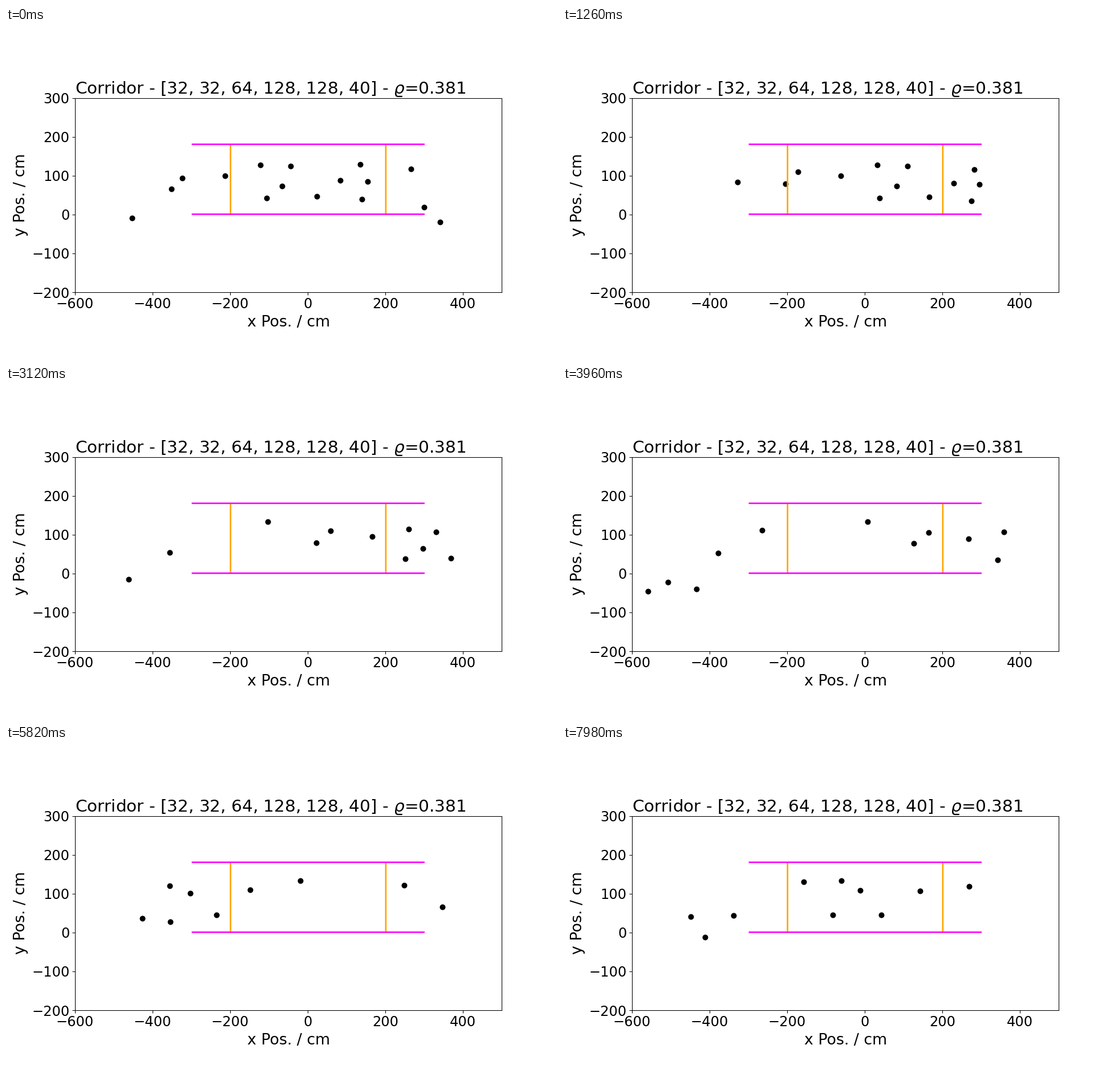
Animation, 966 px wide and 580 px high, one loop 8000 ms. Source, as a matplotlib script:

```python
import math

import matplotlib.pyplot as plt
import numpy as np
from matplotlib.animation import FuncAnimation
from matplotlib.transforms import ScaledTranslation

DPI, WIDTH, HEIGHT = 96, 966, 580
STEP = 0.06              # seconds between position updates
STEPS = 134
TICK_MS, FRAMES = 20, 400
START_Y, LEAVE_X = -45, 375
BEND_X = -418            # usual place where walkers turn into the corridor

# Already inside: x and lane, in cm
INSIDE = [(-351, 79), (-323, 110), (-213, 100), (-122, 128), (-106, 42),
          (-66, 74), (-44, 125), (23, 47), (84, 88), (135, 132), (139, 40),
          (154, 88), (266, 131), (300, 22), (341, -22)]

# Still approaching: entry time, entry x, lane, bend
APPROACHING = [(0, -453, 134, -378), (1.86, -492, 134, -368),
               (2.88, -489, 110, -400), (3.54, -485, 46, -380),
               (3.66, -543, 108, -432), (3.96, -558, 45, -380),
               (4.32, -523, 134, -488), (4.8, -545, 132, -418),
               (6.72, -470, 46, -410), (7.26, -527, 110, -458),
               (7.44, -481, 110, -355)]


def exit_ramp(x):
    return min(max((x - 100) / 250, 0), 1)


def height(x, lane, bend):
    """Sweep from the starting height into the lane, then sag at the exit."""
    width = max(0.4 * lane, 15)
    left = 1 / (1 + math.exp((x - bend) / width))
    return lane * (1 - 0.16 * exit_ramp(x)) - (lane - START_Y) * left


def walk(start, x, lane, bend=BEND_X):
    """Position at every step; upper lanes and later walkers are faster."""
    track = np.full((STEPS, 2), np.nan)
    for i in range(round(start / STEP), STEPS):
        if x > LEAVE_X:
            break
        y = height(x, lane, bend)
        track[i] = x, y
        speed = 117 + 0.1 * (lane - 84) + 2.2 * i * STEP
        speed *= 1 - 0.12 * exit_ramp(x)
        slope = height(x + 1, lane, bend) - y
        x += speed * STEP / math.hypot(1, slope)
    return track


tracks = np.array([walk(0, *spot) for spot in INSIDE]
                  + [walk(*entry) for entry in APPROACHING])

plt.rcParams["font.family"] = "DejaVu Sans"
fig, ax = plt.subplots(figsize=(WIDTH / DPI, HEIGHT / DPI), dpi=DPI)
ax.set_aspect("equal")
ax.set(xlim=(-600, 500), ylim=(-200, 300),
       xticks=range(-600, 401, 200), yticks=range(-200, 301, 100))
ax.tick_params(labelsize=18.1)
ax.set_xlabel("x Pos. / cm", fontsize=20.1, labelpad=4.75)
ax.set_ylabel("y Pos. / cm", fontsize=20.1, labelpad=4.75)
ax.set_title(r"Corridor - [32, 32, 64, 128, 128, 40] - $\varrho$=0.381",
             loc="left", fontsize=22.1)

gates = ax.vlines([-200, 200], 0, 180, color="orange", lw=2, zorder=2)
walls = ax.hlines([0, 180], -300, 300, color="magenta", lw=2, zorder=2.1)
nudge = ScaledTranslation(0.65 / DPI, 0.65 / DPI, fig.dpi_scale_trans)
for lines in (gates, walls):
    lines.set_snap(False)
    lines.set_transform(ax.transData + nudge)

dots = ax.scatter([], [], s=36, color="black", lw=1.5, zorder=1)


def update(frame):
    spots = tracks[:, frame * TICK_MS // 60]
    dots.set_offsets(spots[~np.isnan(spots[:, 0])])
    return dots,


anim = FuncAnimation(fig, update, frames=FRAMES, interval=TICK_MS,
                     repeat=True, repeat_delay=0, blit=False)
plt.show()
```
